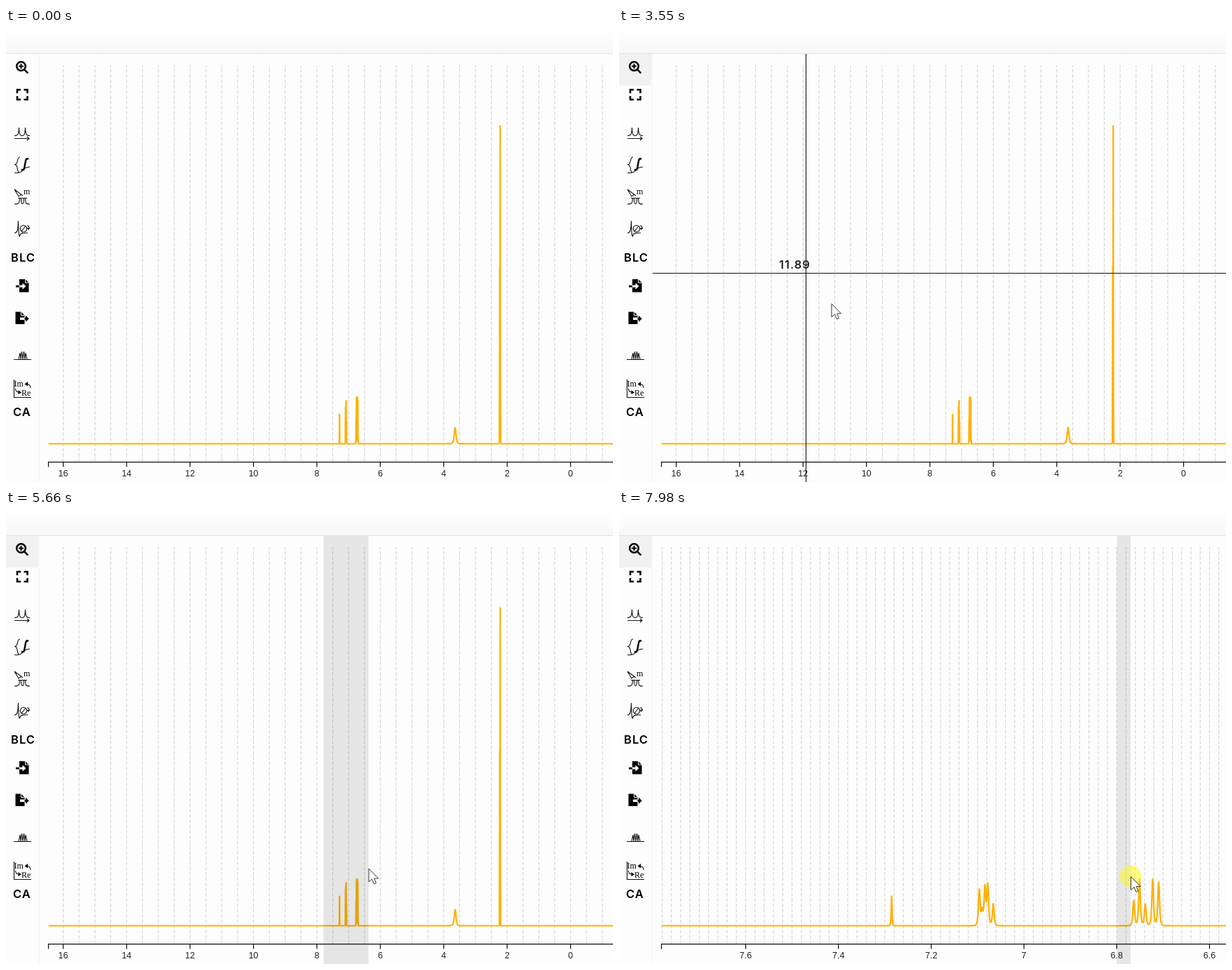
Recreate the animation shown at these times as an HTML page. Size 865x647 px, loop 8 s.

```html
<!DOCTYPE html>
<html lang="en">
<head>
<meta charset="utf-8">
<title>Spectrum zoom</title>
<style>
  html, body { margin: 0; width: 100%; height: 100%; overflow: hidden; background: #fdfdfd; }
  svg { display: block; }
  .grid { stroke: #d8d8d8; stroke-width: 1.25; stroke-dasharray: 5 2.5; fill: none; }
  .axis { stroke: #111; stroke-width: 1.25; fill: none; }
  .tick { font: 12.5px "Liberation Sans", Arial, sans-serif; fill: #222; text-anchor: middle; }
  .curve { stroke: #ffb000; stroke-width: 2.2; stroke-linejoin: round; fill: none; }
  .bold { font: 600 16.5px Inter, sans-serif; letter-spacing: 1px; fill: #000; }
  .label { fill: #222; }
  .tip { font: 13px "Noto Sans", "Open Sans", sans-serif; fill: #fff; }
  .serif { font: 12px "Liberation Serif", serif; }
  .thin { stroke: #111; stroke-width: 1.1; fill: none; }
  .thick { stroke: #000; stroke-width: 2.6; fill: none; }
  .cross { stroke: #111; stroke-width: 1.1; }
  .cut { stroke: #fdfdfd; fill: none; }
</style>
</head>
<body>
<svg width="865" height="647" viewBox="0 0 865 647">
  <defs>
    <linearGradient id="bar" x2="0" y2="1">
      <stop offset="0" stop-color="#fff"/><stop offset="1" stop-color="#f7f7f7"/>
    </linearGradient>
    <clipPath id="plotArea"><rect x="48" y="37" width="817" height="610"/></clipPath>
  </defs>
  <rect width="865" height="647" fill="#fdfdfd"/>
  <rect width="865" height="37" fill="url(#bar)"/>
  <path d="M0 36.5H865" stroke="#e2e2e2"/>
  <path d="M47.5 37V647" stroke="#f3f3f3"/>

  <g id="views" clip-path="url(#plotArea)"></g>

  <g clip-path="url(#plotArea)">
    <rect id="brush" y="37" height="610" opacity=".095"/>
    <g id="cross">
      <path id="lineX" class="cross" d="M0 37V647"/>
      <path id="lineY" class="cross" d="M48 0H865"/>
      <text id="value" class="bold label"></text>
    </g>
  </g>

  <rect id="active" y="37" width="46" height="45" fill="#f1f1f1"/>
  <!-- zoom, full screen -->
  <circle cx="21.5" cy="54.5" r="6.3" class="thick"/>
  <path d="M26.3 59.3L31.3 64.3" class="thick"/>
  <path d="M18 54.5H25M21.5 51V58" stroke="#000" stroke-width="2"/>
  <path d="M16 93V88H21M25.5 88H30.5V93M30.5 97V102H25.5M21 102H16V97" class="thick"/>
  <!-- peak picking -->
  <path d="M12 153.5C17 153.5 18 152 18.5 142C19 152 20 153.5 23 153.5C26 153.5 27 152 27.5 142C28 152 29 153.5 34 153.5M12 157.5H33M30 155L33 157.5L30 160" class="thin"/>
  <!-- integral -->
  <path d="M20 184C15 184 18 193 13 194.500C18 196 15 206 19 206C24 206 21 199 34 198M12 206.5H18" class="thin"/>
  <path d="M32 187C28 184 28 190 27 195C26 200 26 204 22 201.500" fill="none" stroke="#000" stroke-width="2.4"/>
  <!-- multiplet -->
  <path d="M12 230L24 239M12 230L18 240L22 237M17 242.5H30M12 251C19 251 19 249 19.5 243M21.5 243C21.5 253 25.5 253 25.5 243M27.5 243C28 250 28 251 34 251" class="thin"/>
  <text x="25" y="237" class="serif" font-style="italic" font-weight="700">m</text>
  <!-- phase -->
  <path d="M12 292C16 292 17 289 17.5 275C18 290 18 297 19.5 297C20.5 292 22 292 31 292M22 290L28 282M30 282C33 281 33 284 32 287M30 285L32 287L34 284.5" class="thin"/>
  <circle cx="25" cy="286" r="4.7" class="thin"/>
  <text x="7" y="332.5" class="bold">BLC</text>
  <!-- import, export -->
  <path d="M19 358H27.5L32.5 363V376.5H19Z"/>
  <path d="M27.5 358V363H32.5" class="cut"/>
  <path d="M19 366.5H23.5V363.5L28.5 368L23.5 372.5V369.5H19Z" fill="#fdfdfd"/>
  <path d="M14 366.7H19V369.5H14Z"/>
  <path d="M13.5 404.5H21.5L26.5 409.5V422H13.5Z"/>
  <path d="M21.5 404.5V409.5H26.5" class="cut"/>
  <path d="M20 412.5H27V416H20Z" fill="#fdfdfd"/>
  <path d="M26.5 412.8H28V409.8L32.8 414.2L28 418.7V415.7H26.5Z"/>
  <!-- stacked peaks -->
  <path d="M11 472.5H36M18 472L20 463L21 472L22.5 461L24 472L25.5 461L27 472L28 463L30 472" class="thin"/>
  <!-- real / imaginary -->
  <path d="M11.5 501V526.5H36M35 513C35 509 32 507.5 29 507.5M13.5 514C13.5 518 16 519 19 519" class="thin"/>
  <path d="M31 504L26.5 507.5L31 510.5ZM17.5 516L22 519.5L17.5 522Z"/>
  <text x="11.5" y="511" class="serif">Im</text>
  <text x="22" y="524" class="serif">Re</text>
  <text x="10" y="553" class="bold">CA</text>

  <g id="tooltip">
    <rect x="52" y="48" width="104" height="23" rx="3" fill="#808080"/>
    <text x="56" y="64.5" class="tip">Zoom ( Press z )</text>
  </g>
  <g id="mouse">
    <circle id="press" r="15.5" fill="#faf532" opacity=".6"/>
    <path d="M.5 .5V19.500L5 15.500L8 22.500L11 21.200L8.200 14.500H14Z" fill="#fff" stroke="#222" stroke-width=".9"/>
    <text id="help" x="16.5" y="27.5" fill="#fff" stroke="#222" stroke-width=".9" style="font:700 16px 'Liberation Sans',sans-serif">?</text>
  </g>
</svg>
<script>
const LOOP = 8000, BASE = 592.5, LEFT = 60.5, RIGHT = 866;
const $ = id => document.getElementById(id);

// Evenly spaced lines from a first shift downwards; heights in px.
const multiplet = (first, gap, width, ...heights) =>
  heights.map((height, k) => ({ ppm: first - k * gap, height, width }));
const peaks = [
  multiplet(7.2853, 0, .0016, 42),
  multiplet(7.0962, .006, .0033, 51, 20, 54, 58, 0, 31),
  multiplet(6.7634, .0125, .0033, 36, 66, 31),
  multiplet(6.7225, .0129, .0033, 66, 62),
  multiplet(3.641, 0, .05, 23),
  multiplet(2.234, .0155, .004, 250, 452)
].flat();
const intensity = ppm =>
  peaks.reduce((sum, p) => sum + p.height / (1 + ((ppm - p.ppm) / p.width) ** 2) ** 2, 0);

function makeView(ppm0, x0, scale, gridStep, tickStep, digits) {
  const toX = p => x0 + (ppm0 - p) * scale;
  const toPpm = x => ppm0 - (x - x0) / scale;
  const ticks = step => {
    const out = [];
    for (let k = Math.floor(toPpm(LEFT) / step); toX(k * step) < RIGHT; k--) out.push(k * step);
    return out;
  };
  const xs = peaks.map(p => toX(p.ppm)).filter(x => x > LEFT && x < RIGHT);
  for (let x = LEFT; x <= RIGHT; x += .5) xs.push(x);
  xs.sort((a, b) => a - b);
  const curve = xs.map(x => `${x.toFixed(2)} ${(BASE - intensity(toPpm(x))).toFixed(2)}`).join('L');
  const major = ticks(tickStep);
  const grid = ticks(gridStep).map(p => `M${toX(p).toFixed(2)} 618.5V53`).join('');
  const marks = major.map(p => `M${toX(p).toFixed(2)} 618.5v7`).join('');
  const text = major.map(p =>
    `<text class="tick" x="${toX(p).toFixed(2)}" y="639">${+p.toFixed(digits)}</text>`).join('');
  const g = document.createElementNS('http://www.w3.org/2000/svg', 'g');
  g.innerHTML = `<path class="grid" d="${grid}"/><path class="axis" d="M${LEFT} 625.5v-7H${RIGHT}${marks}"/>` +
    `${text}<path class="curve" d="M${curve}"/>`;
  $('views').append(g);
  return { g, toPpm };
}
const full = makeView(16, 81.5, 45.19, .5, 2, 0);
const zoomed = makeView(7.6, 180.5, 661, .02, .2, 1);

// Each move begins where the last one ended, unless it has its own origin.
// A higher power brakes harder; 1 is a steady pace.
const moves = [
  { start: 530, end: 1280, steps: 11, power: 2, from: [797, 721], to: [48, 69] },
  { start: 1380, end: 1980, steps: 9, power: 1, to: [22.5, 59.5] },
  { start: 3080, end: 3700, steps: 9, power: 1, from: [52, 86], to: [374, 480] },
  { start: 3880, end: 4180, steps: 5, power: 7, to: [452.3, 503.5] },
  { start: 4720, end: 5180, steps: 7, power: 2, to: [516.5, 510.5] },
  { start: 6360, end: 6740, steps: 6, power: 3, to: [710, 522.5] },
  { start: 7910, end: 7980, steps: 2, power: 1, to: [729, 522] }
];
moves.forEach((m, i) => m.from ??= moves[i - 1].to);

function pointer(t) {
  const m = moves.findLast(v => t >= v.start);
  if (!m) return null;
  const progress = (t - m.start) / (m.end - m.start) * (m.steps - 1);
  const step = Math.min(m.steps, Math.floor(progress + .2) + 1);
  const place = s => {
    const k = 1 - (1 - s / m.steps) ** m.power;
    return m.from.map((a, c) => a + (m.to[c] - a) * k);
  };
  return { at: place(step), trail: place(step - 1) };
}

const show = (el, on) => { el.style.display = on ? '' : 'none'; };
const within = (t, ...spans) => spans.some(([a, b]) => t >= a && t < b);

function draw(t) {
  const view = t < 5810 ? full : zoomed;
  const hover = within(t, [1380, 3080]);
  const dragging = within(t, [4720, 5810], [7910, LOOP]);
  const crossing = t >= 3080 && !dragging;
  show(full.g, view === full);
  show(zoomed.g, view === zoomed);
  show($('active'), t >= 2520);
  show($('tooltip'), hover);
  show($('help'), hover);
  show($('press'), within(t, [1980, 2520], [4340, 5660], [7280, LOOP]));
  show($('brush'), dragging);
  show($('cross'), crossing);
  const p = pointer(t);
  show($('mouse'), p);
  if (!p) return;
  $('mouse').setAttribute('transform', `translate(${p.at})`);
  if (dragging) {
    const from = view === full ? 452.5 : 709.5;
    $('brush').setAttribute('x', from);
    $('brush').setAttribute('width', Math.max(0, p.at[0] - from));
  }
  if (crossing) {
    const [x, y] = p.trail;
    const lx = Math.round(x) - .5, ly = Math.round(y) + .5;
    $('lineX').setAttribute('transform', `translate(${lx} 0)`);
    $('lineY').setAttribute('transform', `translate(0 ${ly})`);
    $('value').setAttribute('x', lx - 38.5);
    $('value').setAttribute('y', ly - 6.5);
    $('value').textContent = view.toPpm(x + .7).toFixed(2);
  }
}

const begin = performance.now();
function tick() {
  draw((performance.now() - begin) % LOOP);
  requestAnimationFrame(tick);
}
tick();
</script>
</body>
</html>
```
